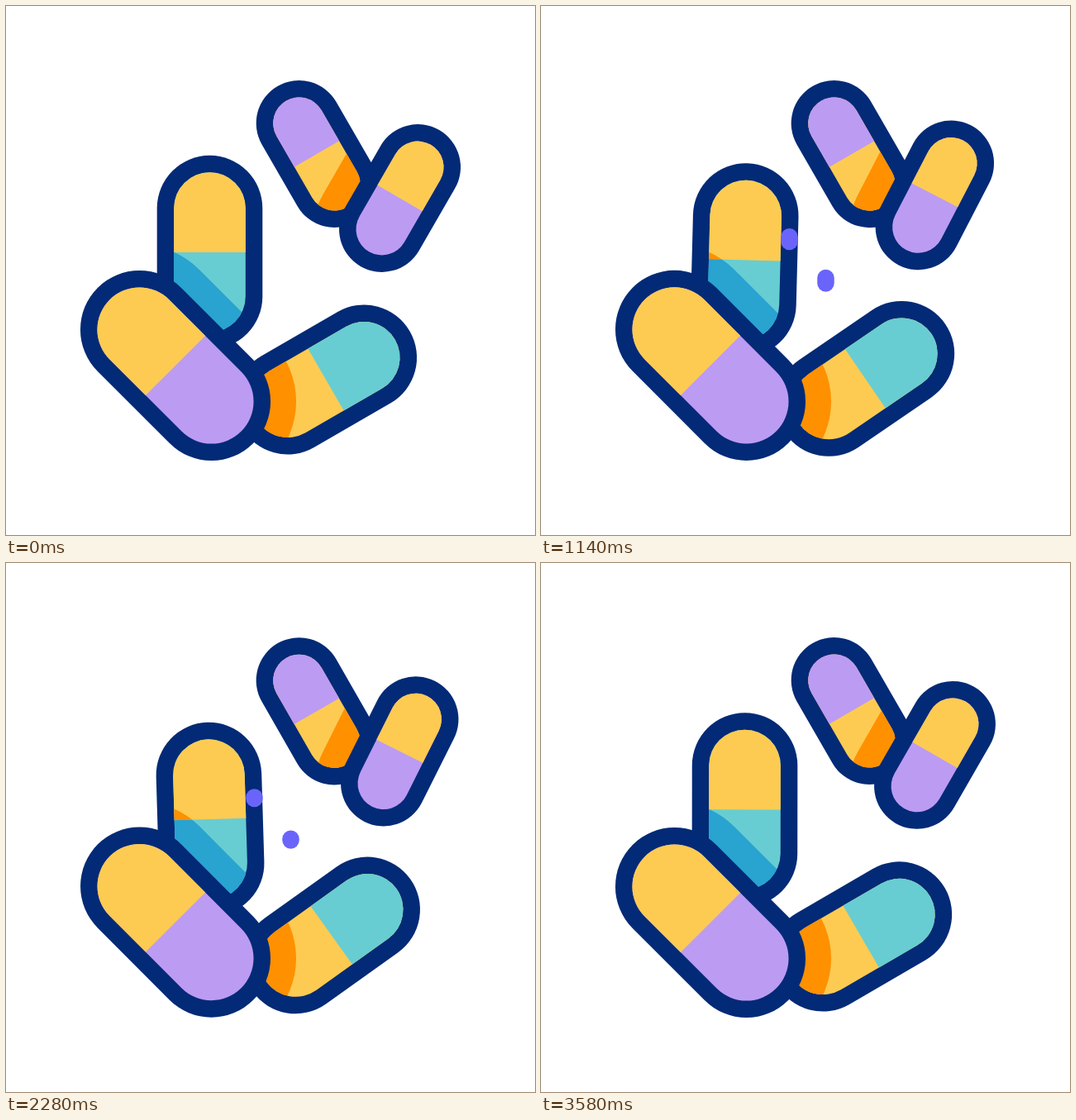
An HTML page with a canvas that plays this animation: 640x640 px, repeating every 3600 ms.

```html
<!DOCTYPE html>
<html lang="en">
<head>
<meta charset="utf-8">
<title>Pills</title>
<style>
  html, body { margin: 0; width: 100%; height: 100%; overflow: hidden; background: #fff; }
  canvas { display: block; width: 100vmin; height: 100vmin; }
</style>
</head>
<body>
<canvas id="stage" width="640" height="640"></canvas>
<script>
const ctx = document.getElementById('stage').getContext('2d');
const LOOP = 3600, CYCLE = 1160, BORDER = 20.5, SHADOW = 31;
const NAVY = '#032a76', YELLOW = '#fdcb52', TEAL = '#67cdd2', PURPLE = '#bc9bf3', BAR = '#6a64fb';
const SHADE = { [YELLOW]: '#ff9000', [TEAL]: '#29a3d0' };

// at: resting x, y, tilt; move: change at the far pose; bend: control point of the path
const front = { at: [205, 435, -45], move: [6.2, -41, 8.8], bend: [.2, .5], delay: 0, rise: 600,
  half: 61.6, radius: 51, colors: [YELLOW, PURPLE] };
const right = { at: [476.5, 232.5, 30], move: [-11, -29.7, -22], bend: [0, .5], delay: 130, rise: 555,
  half: 43.4, radius: 31.3, colors: [YELLOW, PURPLE] };
const pills = [
  { at: [246.5, 298, 0], move: [-11, 84.5, 12.3], moveOdd: [21.5, 84, -11], bend: [0, .45], delay: 130, rise: 555,
    half: 53.4, radius: 43.3, colors: [YELLOW, TEAL], under: front },
  { at: [387, 452, 60], move: [31.5, -28.7, -35.8], bend: [.72, .12], delay: 130, rise: 555,
    half: 53.4, radius: 43.3, colors: [TEAL, YELLOW], under: front },
  front,
  { at: [376, 179, -30], move: [-33, 41.5, 17.5], bend: [.2, .45], delay: 0, rise: 600,
    half: 43, radius: 31.3, colors: [PURPLE, YELLOW], under: right },
  right
];

// Speed lines grow upward from their foot, then leave upward. Lines: x, foot y, length
const bars = [
  { lines: [[485.5, 181, 125.5], [533, 227, 125.5]], starts: [550, 550 + CYCLE], grow: 285, leave: 285 },
  { lines: [[300.5, 285, 125], [344.5, 335.5, 137]], starts: [1100, 1100 + CYCLE], grow: 268, leave: 258 },
  { lines: [[144, 422, 109], [189.5, 376, 109], [234.5, 464, 95]], starts: [480 + 2 * CYCLE], grow: 280, leave: 280 }
];

const clamp = (v, lo = 0, hi = 1) => Math.min(hi, Math.max(lo, v));

function ease(u) {
  u = clamp(u);
  return u < .5 ? 2 * u * u : 1 - 2 * (1 - u) ** 2;
}

function pose(pill, time) {
  const { at, bend, delay, rise } = pill;
  const cycle = clamp(Math.floor((time - delay) / CYCLE), 0, 2);
  const local = time - delay - cycle * CYCLE;
  const q = local < rise ? ease(local / rise) : 1 - ease((local - rise) / (CYCLE - rise));
  const move = cycle === 1 && pill.moveOdd || pill.move;
  const along = i => at[i] + move[i] * (2 * q * (1 - q) * bend[i] + q * q);
  return { x: along(0), y: along(1), angle: (at[2] + move[2] * q) * Math.PI / 180 };
}

function line(x1, y1, x2, y2, width, color) {
  ctx.beginPath();
  ctx.moveTo(x1, y1);
  ctx.lineTo(x2, y2);
  ctx.lineWidth = width;
  ctx.strokeStyle = color;
  ctx.stroke();
}

function capsule({ half, radius }, { x, y, angle }, grow, color) {
  const dx = half * Math.sin(angle), dy = -half * Math.cos(angle);
  line(x - dx, y - dy, x + dx, y + dy, 2 * (radius + grow), color);
}

function drawPill(pill, time) {
  const p = pose(pill, time), { half, radius: r } = pill;
  capsule(pill, p, BORDER, NAVY);
  capsule(pill, p, 0, pill.colors[1]);
  pill.colors.forEach((color, i) => {
    ctx.save();
    ctx.translate(p.x, p.y);
    ctx.rotate(p.angle + i * Math.PI);
    ctx.beginPath();
    ctx.moveTo(r, 0);
    ctx.lineTo(r, -half);
    ctx.arc(0, -half, r, 0, Math.PI, true);
    ctx.lineTo(-r, 0);
    ctx.closePath();
    if (i === 0) {
      ctx.fillStyle = color;
      ctx.fill();
    }
    if (pill.under && SHADE[color]) {
      ctx.clip();
      ctx.setTransform(1, 0, 0, 1, 0, 0);
      capsule(pill.under, pose(pill.under, time), BORDER + SHADOW, SHADE[color]);
    }
    ctx.restore();
  });
}

function drawBars({ lines, starts, grow, leave }, time) {
  for (const start of starts) {
    const local = time - start;
    if (local <= 0 || local >= grow + leave) continue;
    const head = ease(local / grow), tail = ease((local - grow) / leave);
    for (const [x, foot, length] of lines)
      line(x, foot - length * tail, x, foot - length * head - .01, 20.5, BAR);
  }
}

function frame() {
  const time = performance.now() % LOOP;
  ctx.fillStyle = '#fff';
  ctx.fillRect(0, 0, 640, 640);
  ctx.lineCap = 'round';
  pills.forEach(pill => drawPill(pill, time));
  bars.forEach(set => drawBars(set, time));
  requestAnimationFrame(frame);
}
frame();
</script>
</body>
</html>
```
